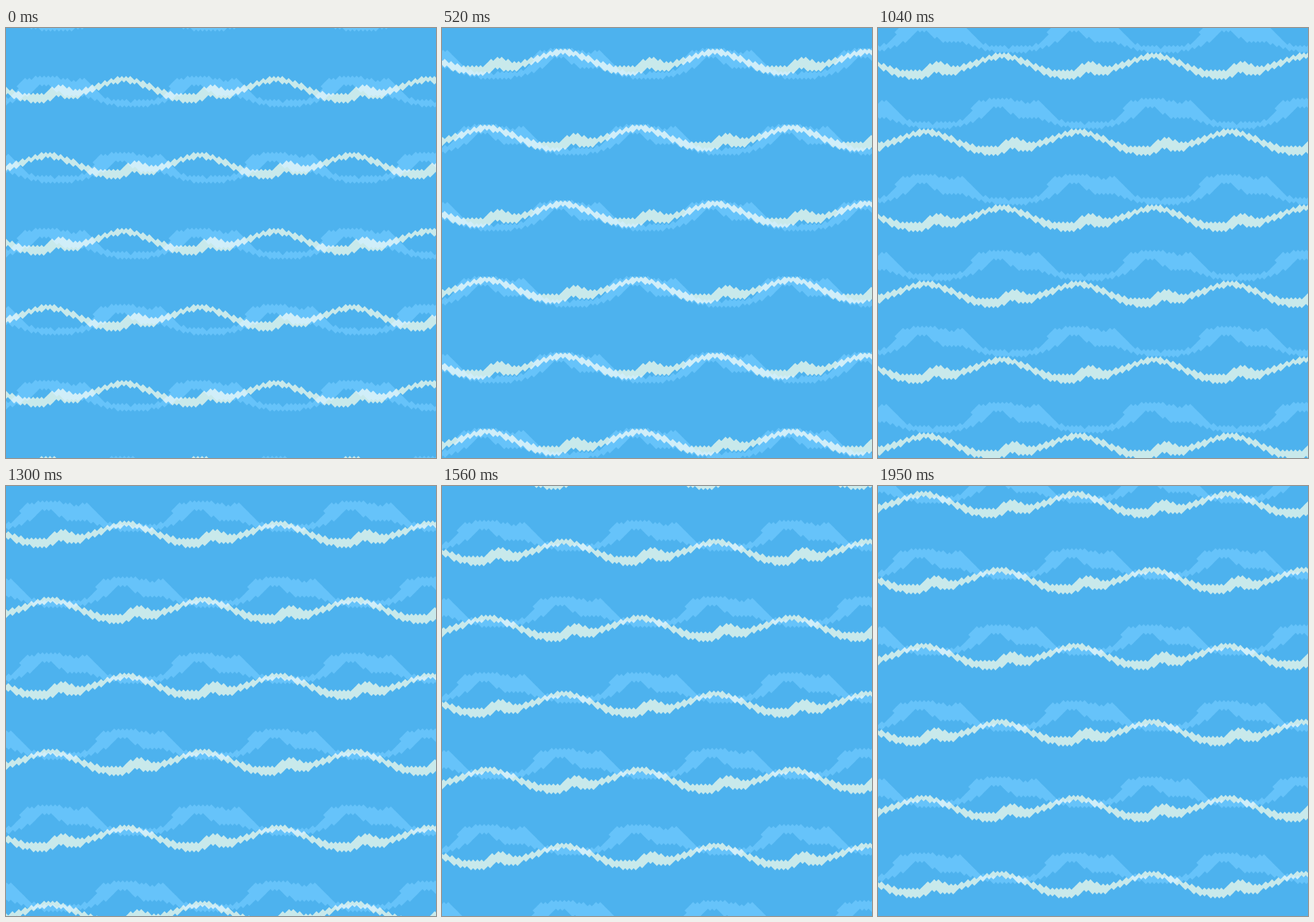
Write an HTML page with a canvas that moves like this. It is 576x576 px and loops after 2080 ms.

```html
<!DOCTYPE html>
<html lang="en">
<head>
<meta charset="utf-8">
<title>Water</title>
<style>
html, body { margin: 0; width: 100%; height: 100%; overflow: hidden; background: #4db2ee; }
canvas { display: block; }
</style>
</head>
<body>
<canvas id="stage" width="576" height="576"></canvas>
<script>
const SIZE = 576;
const STEP_MS = 130;
const STEPS = 16;
// A square tile turned by 45 degrees: its diagonal is the wave length.
const PERIOD = 144 * Math.SQRT2;
const HALF = PERIOD / 2;
const COLUMNS = 72;
const CELL = PERIOD / COLUMNS; // half diagonal of one texture pixel

const ctx = document.getElementById('stage').getContext('2d');

const bump = (x, center, width) => Math.exp(-(((x - center) / width) ** 2) / 2);

function smooth(x, from, to) {
  const u = Math.min(1, Math.max(0, (x - from) / (to - from)));
  return u * u * (3 - 2 * u);
}

// Sharp crests, with a thick crumb of foam on the rising side.
function foamBand(x) {
  const middle = -1.2 + 26 * Math.sin(Math.PI * x / PERIOD) ** 1.5
    + 3 * bump(x, 60, 14) - 10 * bump(x, 116, 10);
  const half = 3.4 + 2 * bump(x, 85, 18) + 4.3 * bump(x, 121, 15);
  return [middle - half, middle + half];
}

// A thin swell whose first part is raised to a broad hump.
function glowBand(x) {
  const swell = 27 + 7 * Math.cos(2 * Math.PI * (x - 165) / PERIOD);
  const plateau = smooth(x, 0, 24) - smooth(x, 104, 132);
  return [
    swell - 20 * plateau + 5 * bump(x, 82, 10),
    swell + 7.5 - 17 * bump(x, 46, 14) - 4 * bump(x, 108, 18)
  ];
}

// Fills a band with diamond pixels; a slight overlap hides the seams.
function bandPath(band) {
  const path = new Path2D();
  const r = CELL + 0.15;
  for (let i = 0; i < COLUMNS; i++) {
    const x = i * CELL;
    const [top, bottom] = band(x);
    for (let j = Math.ceil(top / CELL); j * CELL <= bottom; j++) {
      if ((i + j) % 2) continue;
      const y = j * CELL;
      path.moveTo(x, y - r);
      path.lineTo(x + r, y);
      path.lineTo(x, y + r);
      path.lineTo(x - r, y);
      path.closePath();
    }
  }
  return path;
}

// Path of the whole water surface.
const route = [
  { step: 0, x: 3, y: 70 },
  { step: 2, x: 0, y: 49.5 },
  { step: 4, x: 7, y: 33 },
  { step: 8, x: 11, y: 38.5 },
  { step: 11, x: 5, y: 62 },
  { step: 13, x: 12, y: 91.5 },
  { step: 15, x: 8, y: 114 }
];

function slope(i, axis) {
  const a = route[Math.max(0, i - 1)];
  const b = route[Math.min(route.length - 1, i + 1)];
  return (b[axis] - a[axis]) / (b.step - a.step);
}

function along(step, axis) {
  const i = Math.max(1, route.findIndex(p => p.step >= step));
  const [a, b] = [route[i - 1], route[i]];
  const span = b.step - a.step;
  const u = (step - a.step) / span;
  const v = 1 - u;
  return a[axis] * v * v * (1 + 2 * u) + b[axis] * u * u * (3 - 2 * u) +
    span * u * v * (v * slope(i - 1, axis) - u * slope(i, axis));
}

// The glow slides down against the foam and comes to rest.
const slide = step => -6 + 179 * (1 - Math.max(0, 1 - step / 11) ** 1.85);

function drawLayer(path, color, x, y, mode) {
  ctx.globalCompositeOperation = mode;
  ctx.fillStyle = color;
  for (let row = -5; row <= 6; row++) {
    const rowY = y + row * HALF;
    if (rowY < -60 || rowY > SIZE + 20) continue;
    const rowX = x + (row & 1) * HALF;
    for (let col = -3; col <= 3; col++) {
      ctx.setTransform(1, 0, 0, 1, rowX + col * PERIOD, rowY);
      ctx.fill(path);
    }
  }
  ctx.setTransform(1, 0, 0, 1, 0, 0);
}

const foam = bandPath(foamBand);
const glow = bandPath(glowBand);

function draw(step) {
  const x = along(step, 'x');
  const y = along(step, 'y');
  ctx.globalCompositeOperation = 'source-over';
  ctx.fillStyle = '#4db2ee';
  ctx.fillRect(0, 0, SIZE, SIZE);
  drawLayer(foam, '#c8e9eb', x + 155, y, 'source-over');
  drawLayer(glow, 'rgb(36, 56, 180)', x, y + slide(step), 'screen');
}

const start = performance.now();
function tick() {
  draw(Math.floor((performance.now() - start) / STEP_MS) % STEPS);
  requestAnimationFrame(tick);
}
tick();
</script>
</body>
</html>
```
